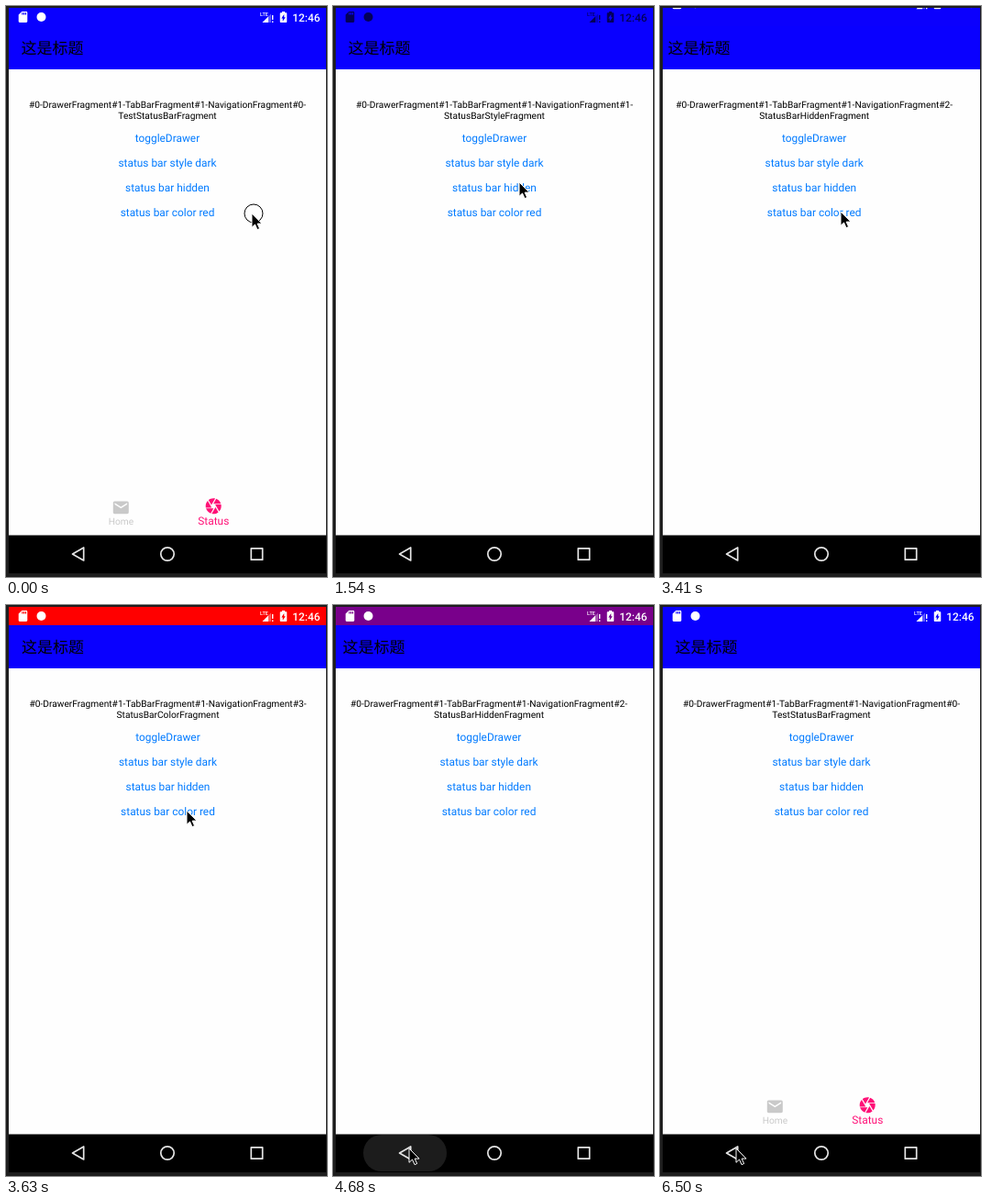
These frames come from a looping animation (350x622 px, 6670 ms). An HTML page:

```html
<!DOCTYPE html>
<html lang="zh">
<head>
<meta charset="utf-8">
<title>Status bar demo</title>
<style>
  html, body { margin: 0; width: 100%; height: 100%; overflow: hidden; background: #1e1e1e; }
  svg { display: block; width: 350px; height: 622px; font-family: Roboto, sans-serif; text-rendering: geometricPrecision; }
  .title { font: 17px "Noto Sans CJK SC", "Noto Sans CJK", sans-serif; }
  .path { font-size: 10.2px; text-anchor: middle; }
  .link { font-size: 11.9px; text-anchor: middle; fill: #007aff; }
  .tab { text-anchor: middle; }
</style>
</head>
<body>
<svg viewBox="0 0 350 622">
  <rect x="3" y="2" width="346" height="67" fill="#0900ff"/>
  <rect x="3" y="69" width="346" height="508" fill="#fefefe"/>
  <rect id="tint" x="3" y="2" width="346" height="20" fill="#f00"/>
  <g id="pages"></g>

  <g id="status">
    <path transform="translate(11.3 4.8) scale(.6)" d="M18 2h-8L4.02 8 4 20c0 1.1.9 2 2 2h12c1.1 0 2-.9 2-2V4c0-1.1-.9-2-2-2zm-6 6h-2V4h2v4zm3 0h-2V4h2v4zm3 0h-2V4h2v4z"/>
    <circle cx="38.5" cy="12" r="5"/>
    <text x="277" y="10.5" font-size="5.6" font-weight="500">LTE</text>
    <path d="M279.5 18L289 8.5V18z" opacity=".35"/>
    <path d="M279.5 18L286 11.5V18z"/>
    <path d="M290 10h1.4v5h-1.4zM290 16.4h1.4v1.6h-1.4z"/>
    <path transform="translate(293.5 4.8) scale(.75 .6)" d="M15.67 4H14V2h-4v2H8.33C7.6 4 7 4.6 7 5.33v15.33C7 21.4 7.6 22 8.33 22h7.33c.74 0 1.34-.6 1.34-1.33V5.33C17 4.6 16.4 4 15.67 4zM11 20v-5.5H9L13 7v5.5h2L11 20z"/>
    <text x="312.3" y="16.6" font-size="11.9" font-weight="500">12:46</text>
  </g>

  <rect x="3" y="576.5" width="346" height="41.5" fill="#000"/>
  <rect id="ripple" y="577" height="40" rx="20" fill="#1c1c1c"/>
  <g fill="none" stroke="#e4e4e4" stroke-width="1.7" stroke-linejoin="round">
    <path d="M72.5 597L84.7 590V604z"/>
    <circle cx="176" cy="597" r="7.2"/>
    <rect x="267.3" y="590.8" width="12.4" height="12.4"/>
  </g>
  <path fill="#1e1e1e" fill-rule="evenodd" d="M0 0H350V622H0zM3 2V618H349V2z"/>

  <circle id="press" r="10" fill="none" stroke="#000"/>
  <path id="cursor" d="M0 0V15.3L3.5 12L6 17.6L8.6 16.5L6.1 11.1H11z" stroke="#fff" stroke-width="1" stroke-linejoin="round"/>
</svg>
<script>
const LOOP = 6670, WIDTH = 346;
const $ = id => document.getElementById(id);
const put = (el, x, y) => el.setAttribute('transform', `translate(${x} ${y})`);

const names = ['#0-|TestStatusBar', '#1-|StatusBarStyle', '#2-|StatusBarHidden', '#3-|StatusBarColor'];
const links = ['toggleDrawer', 'status bar style dark', 'status bar hidden', 'status bar color red'];
const tabs = `
  <g fill="#c9c9c9">
    <path transform="translate(115.1 536.2) scale(.85)" d="M20 4H4c-1.1 0-1.99.9-1.99 2L2 18c0 1.1.9 2 2 2h16c1.1 0 2-.9 2-2V6c0-1.1-.9-2-2-2zm0 4l-8 5-8-5V6l8 5 8-5v2z"/>
    <text class="tab" x="125.5" y="565" font-size="10.2">Home</text>
  </g>
  <g fill="#ff1177">
    <path transform="translate(216 534.6) scale(.85)" d="M9.4 10.5l4.77-8.26C13.47 2.09 12.75 2 12 2c-2.4 0-4.6.85-6.32 2.25l3.66 6.35.06-.1zM21.54 9c-.92-2.92-3.15-5.26-6-6.34L11.88 9h9.66zm.26 1h-7.49l.29.5 4.76 8.25C21 16.97 22 14.61 22 12c0-.69-.07-1.35-.2-2zM8.54 12l-3.9-6.75C3.01 7.03 2 9.39 2 12c0 .69.07 1.35.2 2h7.49l-1.15-2zm-6.08 3c.92 2.92 3.15 5.26 6 6.34L12.12 15H2.46zm11.27 0l-3.9 6.76c.7.15 1.42.24 2.17.24 2.4 0 4.6-.85 6.32-2.25l-3.66-6.35-.93 1.6z"/>
    <text class="tab" x="226.3" y="565" font-size="11.9">Status</text>
  </g>`;

$('pages').innerHTML = names.map((name, i) => {
  const [index, label] = name.split('|');
  return `<g transform="translate(${i * WIDTH} 0)">
    <text class="title" x="16.4" y="52.2">这是标题</text>
    <text class="path" x="176" y="110.8">#0-DrawerFragment#1-TabBarFragment#1-NavigationFragment${index}</text>
    <text class="path" x="176" y="122.8">${label}Fragment</text>
    ${links.map((s, k) => `<text class="link" x="176" y="${147.8 + 27 * k}">${s}</text>`).join('')}
    ${i ? '' : tabs}</g>`;
}).join('');

const ramp = (t, a, b) => Math.min(1, Math.max(0, (t - a) / (b - a)));
const ease = (t, a, b) => (1 - Math.cos(Math.PI * ramp(t, a, b))) / 2;
const easeOut = (t, a, b) => 1 - (1 - ramp(t, a, b)) ** 2;

// start time and direction of each page change
const slides = [[800, 1], [2130, 1], [3387, 1], [4452, -1], [5324, -1], [6110, -1]];
// grow start and fade start of the back button ripple
const ripples = [[4350, 4700], [5200, 5570], [5990, 6350]];
const presses = [[0, 30], [790, 830], [2010, 2080], [3150, 3300]];
// time, x, y of the pointer
const moves = [[0, 268, 226], [110, 222, 156], [280, 222, 156], [650, 203, 171], [1320, 203, 171],
  [1430, 207, 181], [1540, 203, 192], [2800, 203, 192], [2930, 196, 214], [3010, 197, 224],
  [3780, 197, 224], [4330, 83, 592], [LOOP, 83, 592]];

function pointer(t) {
  const k = moves.findIndex(m => m[0] > t);
  const [t0, x0, y0] = moves[k - 1], [t1, x1, y1] = moves[k];
  const p = ease(t, t0, t1);
  return [x0 + (x1 - x0) * p, y0 + (y1 - y0) * p];
}

function draw(t) {
  const page = slides.reduce((sum, [at, dir]) => sum + dir * ease(t, at, at + 250), 0);
  put($('pages'), -page * WIDTH, 0);

  const shown = 1 - ease(t, 2340, 2500) + easeOut(t, 3380, 3600) - ease(t, 4685, 4850) + easeOut(t, 5330, 5500);
  const dark = ramp(t, 850, 970) - (t >= 3380) + (t >= 5330) - ramp(t, 6150, 6270);
  const grey = 255 * (1 - dark);
  put($('status'), 0, -20 * (1 - shown));
  $('status').setAttribute('fill', `rgb(${grey},${grey},${grey})`);
  $('status').setAttribute('opacity', 1 - .35 * dark);
  $('tint').setAttribute('opacity', ease(t, 3400, 3620) - ease(t, 4570, 4780));

  const ripple = ripples.find(([a, b]) => t >= a && t < b + 150);
  let half = 0, alpha = 0;
  if (ripple) {
    half = 45.5 * (.6 + .4 * easeOut(t, ripple[0], ripple[0] + 200));
    alpha = ramp(t, ripple[0], ripple[0] + 80) * (1 - ramp(t, ripple[1], ripple[1] + 150));
  }
  $('ripple').setAttribute('x', 78.5 - half);
  $('ripple').setAttribute('width', 2 * half);
  $('ripple').setAttribute('opacity', alpha);

  const [x, y] = pointer(t);
  put($('cursor'), x, y);
  put($('press'), x + 2, y);
  $('press').setAttribute('opacity', +presses.some(([a, b]) => t >= a && t < b));
}

const start = performance.now();
function tick(now) {
  draw(Math.max(0, now - start) % LOOP);
  requestAnimationFrame(tick);
}
draw(0);
requestAnimationFrame(tick);
</script>
</body>
</html>
```
